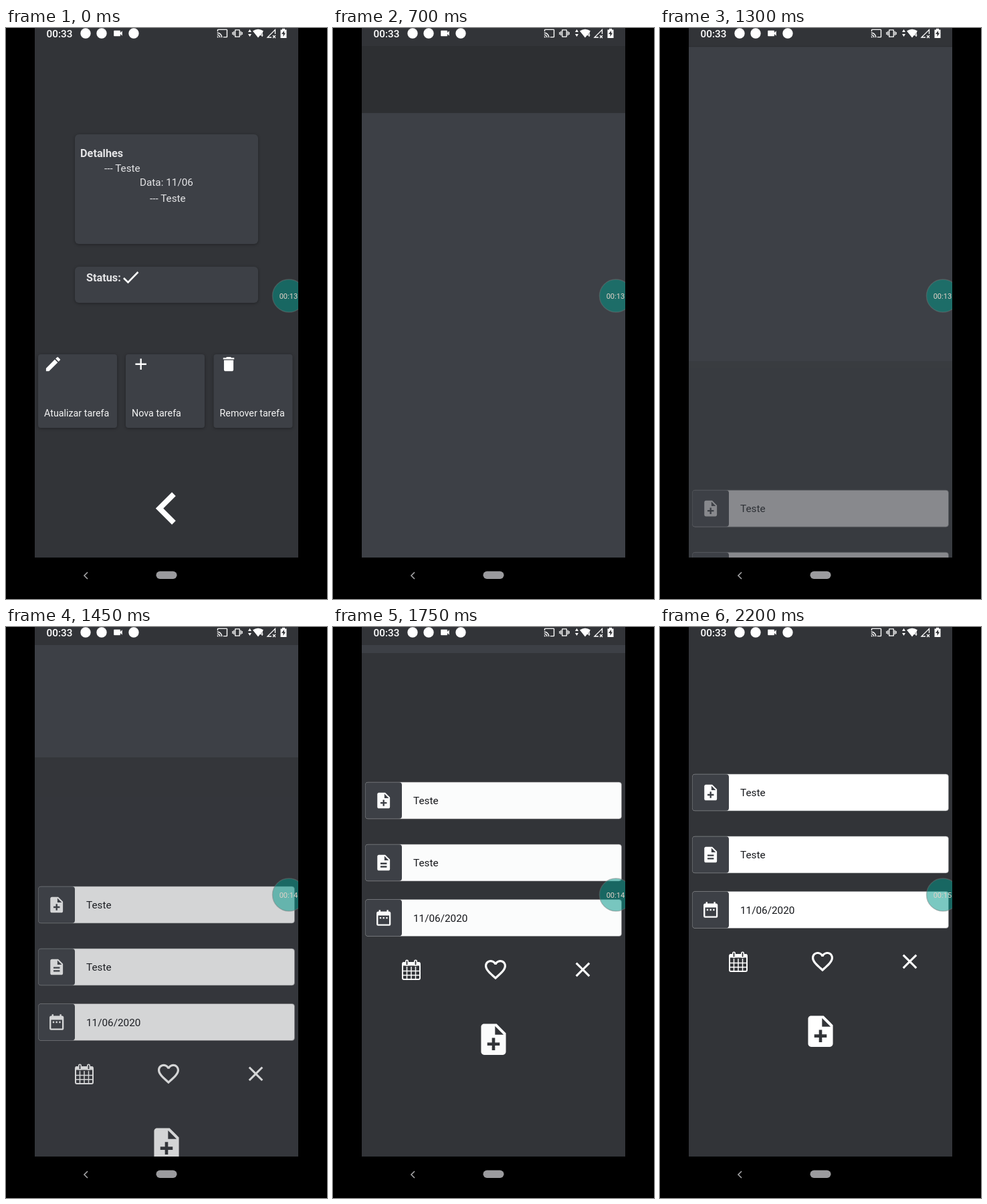
These frames come from a looping animation (480 px wide and 854 px high, 2.25 s). An HTML page:

```html
<!DOCTYPE html>
<html lang="pt">
<head>
<meta charset="utf-8">
<title>Tarefas</title>
<style>
html, body { margin: 0; width: 100%; height: 100%; overflow: hidden; background: #000; }
svg { display: block; width: 480px; height: 854px; }
text { font-family: Roboto, "Liberation Sans", sans-serif; font-size: 15.3px; fill: #e4e4e6; }
path { fill-rule: evenodd; }
.bold { font-weight: 700; font-size: 16.3px; }
.label { font-size: 14.3px; fill: #f4f4f4; }
.value { fill: #16181c; }
.bg { fill: #323438; }
.card { fill: #3d4046; }
.raised { filter: drop-shadow(0 1px 2px #0005); }
.line { fill: none; stroke: #fff; }
</style>
</head>
<body>
<svg id="stage" viewBox="0 0 480 854"></svg>
<script>
const LOOP = 2250, STEP = 50;
const TOP = 27, HEIGHT = 765;

const shapes = {
  edit: 'M3 17.25V21h3.75L17.81 9.94l-3.75-3.75L3 17.25zM20.71 7.04a1 1 0 000-1.41l-2.34-2.34a1 1 0 00-1.41 0l-1.83 1.83 3.75 3.75 1.83-1.83z',
  plus: 'M19 13h-6v6h-2v-6H5v-2h6V5h2v6h6v2z',
  trash: 'M6 19c0 1.1.9 2 2 2h8c1.1 0 2-.9 2-2V7H6v12zM19 4h-3.5l-1-1h-5l-1 1H5v2h14V4z',
  back: 'M15.41 7.41L14 6l-6 6 6 6 1.41-1.41L10.83 12z',
  note: 'M14 2H6c-1.1 0-2 .9-2 2v16c0 1.1.9 2 2 2h12c1.1 0 2-.9 2-2V8l-6-6zm2 14h-3v3h-2v-3H8v-2h3v-3h2v3h3v2zm-3-7V3.5L18.5 9H13z',
  text: 'M14 2H6c-1.1 0-2 .9-2 2v16c0 1.1.9 2 2 2h12c1.1 0 2-.9 2-2V8l-6-6zm2 16H8v-2h8v2zm0-4H8v-2h8v2zm-3-5V3.5L18.5 9H13z',
  date: 'M9 11H7v2h2v-2zm4 0h-2v2h2v-2zm4 0h-2v2h2v-2zm2-7h-1V2h-2v2H8V2H6v2H5c-1.1 0-2 .9-2 2v14a2 2 0 002 2h14c1.1 0 2-.9 2-2V6c0-1.1-.9-2-2-2zm0 16H5V9h14v11z',
  heart: 'M16.5 3c-1.74 0-3.41.81-4.5 2.09C10.91 3.81 9.24 3 7.5 3 4.42 3 2 5.42 2 8.5c0 3.78 3.4 6.86 8.55 11.54L12 21.35l1.45-1.32C18.6 15.36 22 12.28 22 8.5 22 5.42 19.58 3 16.5 3zm-4.4 15.55l-.1.1-.1-.1C7.14 14.24 4 11.39 4 8.5 4 6.5 5.5 5 7.5 5c1.54 0 3.04.99 3.57 2.36h1.87C13.46 5.99 14.96 5 16.5 5c2 0 3.5 1.5 3.5 3.5 0 2.89-3.14 5.74-7.9 10.05z',
  close: 'M19 6.41L17.59 5 12 10.59 6.41 5 5 6.41 10.59 12 5 17.59 6.41 19 12 13.41 17.59 19 19 17.59 13.41 12z',
  video: 'M17 10.5V7c0-.55-.45-1-1-1H4c-.55 0-1 .45-1 1v10c0 .55.45 1 1 1h12c.55 0 1-.45 1-1v-3.5l4 4v-11l-4 4z',
  cast: 'M21 3H3c-1.1 0-2 .9-2 2v3h2V5h18v14h-7v2h7c1.1 0 2-.9 2-2V5c0-1.1-.9-2-2-2zM1 18v3h3c0-1.66-1.34-3-3-3zm0-4v2c2.76 0 5 2.24 5 5h2c0-3.87-3.13-7-7-7zm0-4v2c4.97 0 9 4.03 9 9h2c0-6.08-4.93-11-11-11z',
  vibrate: 'M0 15h2V9H0v6zm3 2h2V7H3v10zm19-8v6h2V9h-2zm-3 8h2V7h-2v10zM16.5 3h-9C6.67 3 6 3.67 6 4.5v15c0 .83.67 1.5 1.5 1.5h9c.83 0 1.5-.67 1.5-1.5v-15c0-.83-.67-1.5-1.5-1.5zM16 19H8V5h8v14z'
};

// Icons live on a 24-unit grid and are placed by their centre.
const icon = (name, x, y, scale) =>
  `<path fill="#fff" transform="translate(${x} ${y}) scale(${scale}) translate(-12 -12)" d="${shapes[name]}"/>`;
const rect = (cls, x, y, w, h, r = 0) =>
  `<rect class="${cls}" x="${x}" y="${y}" width="${w}" height="${h}" rx="${r}"/>`;
const text = (s, x, y, cls = '') => `<text class="${cls}" x="${x}" y="${y}">${s}</text>`;
const dot = x => `<circle cx="${x}" cy="8" r="7.7" fill="#fff"/>`;

const button = (id, x, name, iconX, label) => `<g id="${id}">
  ${rect('card raised', x, 488, 118, 110, 4)}
  ${icon(name, iconX, 502.7, 1.18)}
  ${text(label, x + 9, 580.5, 'label')}</g>`;

const field = (y, name, value) => `
  <rect x="48.5" y="${y}" width="383" height="55" rx="4" fill="#fff" stroke="#77797d" stroke-width=".6"/>
  ${rect('card', 48.5, y + .3, 54.5, 54.4, 4)}
  ${icon(name, 75.7, y + 27.5, 1.18)}
  ${text(value, 120, y + 33.3, 'value')}`;

const calendar = `<g class="line" stroke-width="2">
  <rect x="104" y="490" width="26" height="25" rx="2"/>
  <path d="M104 492H130" stroke-width="5"/>
  <path d="M110.5 496v19M117 496v19M123.5 496v19M104 502.5h26M104 508.8h26" stroke-width="1.5"/>
  <path class="notch" d="M110.5 488v4.5M123.5 488v4.5" stroke-width="5" stroke-linecap="round"/>
  <path d="M110.5 488v4.5M123.5 488v4.5" stroke="#323438" stroke-width="1.8" stroke-linecap="round"/></g>`;

const details = `
  ${rect('bg', 43, TOP, 394, HEIGHT + 20)}
  ${rect('card raised', 103, 159, 274, 164, 6)}
  ${text('Detalhes', 111, 193, 'bold')}
  ${text('--- Teste', 147, 214.5)}
  ${text('Data: 11/06', 200, 235.5)}
  ${text('--- Teste', 215, 259.5)}
  ${rect('card raised', 103, 357, 274, 54, 6)}
  ${text('Status:', 120, 379, 'bold')}
  <path class="line" stroke-width="2.6" d="M176 374l6.5 6.5L197.5 365"/>
  ${button('update', 48, 'edit', 70.5, 'Atualizar tarefa')}
  ${button('create', 179, 'plus', 201.7, 'Nova tarefa')}
  ${button('remove', 310.5, 'trash', 333, 'Remover tarefa')}
  ${icon('back', 240, 718.5, 4.05)}`;

const form = `
  ${rect('bg', 43, TOP, 394, HEIGHT)}
  ${field(220, 'note', 'Teste')}
  ${field(313, 'text', 'Teste')}
  ${field(395.5, 'date', '11/06/2020')}
  ${calendar}
  ${icon('heart', 243, 500.3, 1.6)}
  ${icon('close', 373.5, 500.3, 1.55)}
  ${icon('note', 240, 604.7, 2.32)}`;

const statusBar = `
  ${rect('bg', 43, 0, 394, TOP)}
  <text x="60.5" y="14" style="font-weight:500;fill:#fff">00:33</text>
  ${dot(119)}${dot(143)}${dot(191)}
  ${icon('video', 167.5, 8, .7)}
  ${icon('cast', 323.5, 8, .7)}
  ${icon('vibrate', 346, 8, .65)}
  <path fill="#fff" d="M362 6l2.5-4 2.5 4zM362 9l2.5 4 2.5-4zM369 4.5Q377-1 385 4.5L377 14.5z"/>
  <text x="379.5" y="13" style="font-size:9px;font-weight:700;fill:#fff">4</text>
  <path class="line" stroke-width="1.3" d="M397 14H391L402.500 2.500V9M399 11l4 4M403 11l-4 4"/>
  <path fill="#fff" d="M413 1h4v1.500h2.500V15h-9V2.500H413zM416 4l-4 5h2.500v4l3.500-5.500h-2z"/>`;

const stage = document.getElementById('stage');
stage.innerHTML = `
  <clipPath id="screen"><rect x="43" width="394" height="792"/></clipPath>
  <rect width="480" height="854"/>
  <g clip-path="url(#screen)">
    <g id="details">${details}</g>
    <rect id="dim" x="43" y="${TOP}" width="394" height="${HEIGHT}"/>
    <g id="sheet">${rect('card', 43, TOP, 394, HEIGHT)}</g>
    <g id="form">${form}</g>
    ${statusBar}
    <circle cx="423" cy="400.500" r="24.500" fill="#009688" fill-opacity=".52" stroke="#777" stroke-opacity=".4" stroke-width="1.500"/>
    <text id="clock" x="408.700" y="405" style="font-size:11px;fill:#e2d3c9"></text>
  </g>
  <path fill="none" stroke="#a5a5a7" stroke-width="1.600" d="M122 814l-5 5 5 5"/>
  <rect x="224.500" y="812.500" width="31" height="11.500" rx="5.700" fill="#9b9b9e"/>`;

const el = id => document.getElementById(id);
const clamp = v => Math.min(1, Math.max(0, v));
const shift = (id, y) => el(id).setAttribute('transform', `translate(0 ${y})`);

function bezier(x1, y1, x2, y2) {
  const at = (a, b, s) => 3 * (1 - s) ** 2 * s * a + 3 * (1 - s) * s * s * b + s ** 3;
  return x => {
    let lo = 0, hi = 1;
    for (let i = 0; i < 24; i++) {
      const mid = (lo + hi) / 2;
      if (at(x1, x2, mid) < x) lo = mid; else hi = mid;
    }
    return at(y1, y2, lo);
  };
}
const reveal = bezier(.35, .45, 0, 1);
const slide = bezier(.4, 0, .08, 1);

function draw(t) {
  const sheet = reveal(clamp((t - 209) / 1200));
  const form = slide(clamp((t - 1078) / 825));
  shift('details', -.02 * HEIGHT * sheet);
  shift('sheet', HEIGHT * (1 - sheet));
  shift('form', HEIGHT * (1 - form));
  el('dim').setAttribute('opacity', .1 * clamp(sheet / .36));
  el('form').setAttribute('opacity', form);
  el('update').setAttribute('opacity', 1 - .68 * clamp((t - 100) / 200));
  el('clock').textContent = t < 1400 ? '00:13' : t < 2150 ? '00:14' : '00:15';
}

const start = performance.now();
function tick() {
  const t = (performance.now() - start) % LOOP;
  draw(Math.floor(t / STEP) * STEP);
  requestAnimationFrame(tick);
}
tick();
</script>
</body>
</html>
```
